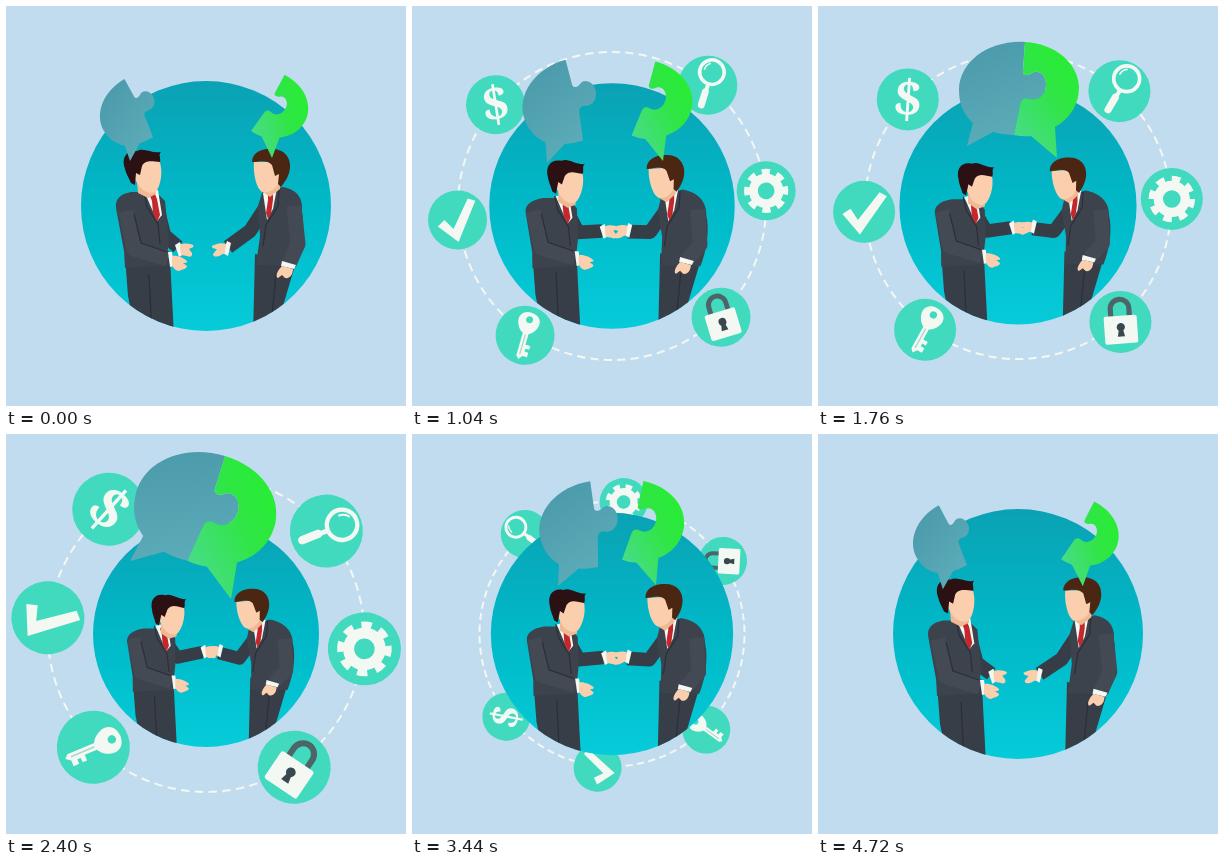
Animation, 400 px wide and 400 px high, one loop 4.8 s. Source, as an HTML page:

```html
<!DOCTYPE html>
<html lang="en">
<head>
<meta charset="utf-8">
<title>Handshake</title>
<style>
html, body { margin: 0; width: 100%; height: 100%; overflow: hidden; background: #c1dcee; }
svg { display: block; width: 100vw; height: 100vh; }
.suit { fill: #3d434d; }
.legs { fill: #383e48; }
.sleeve { fill: none; stroke: #434a54; stroke-width: 15; stroke-linejoin: round; }
.far { stroke: #373d47; stroke-width: 14; }
.skin { fill: #fbcfae; }
.white { fill: #f4f8f3; }
.tie { fill: #c4282d; }
.line { fill: none; stroke: #f4f8f3; }
.fold { fill: none; stroke: #2a2f39; stroke-width: 1.3; }
.badge { fill: #41dabf; }
.dark { fill: #39484f; }
</style>
</head>
<body>
<svg viewBox="0 0 400 400">
  <defs>
    <linearGradient id="sea" x2="0" y2="1">
      <stop stop-color="#0aa2b4"/><stop offset=".5" stop-color="#00b9c8"/><stop offset="1" stop-color="#06cbd9"/>
    </linearGradient>
    <linearGradient id="steel" x1=".2" x2=".5" y2="1">
      <stop stop-color="#4b9aab"/><stop offset="1" stop-color="#5dacb9"/>
    </linearGradient>
    <linearGradient id="lime" x1=".9" x2=".2" y2="1">
      <stop stop-color="#24f02c"/><stop offset=".45" stop-color="#30e546"/><stop offset="1" stop-color="#4adb8e"/>
    </linearGradient>
    <clipPath id="round"><circle cx="200" cy="200" r="125"/></clipPath>
  </defs>

  <circle id="ring" class="line" cx="200" cy="200" pathLength="936" stroke-width="2" stroke-dasharray="8 5"/>

  <g id="icons">
    <g><circle class="badge" r="30"/>
      <text class="white" transform="rotate(4)" y="17" text-anchor="middle" font-family="Noto Serif, serif" font-weight="800" font-size="50">$</text></g>
    <g><circle class="badge" r="30"/>
      <circle class="line" cx="7" cy="-12" r="12.5" fill="#63e2ca" stroke-width="3.6"/>
      <path class="line" d="M0 0L-3 5" stroke-width="4"/>
      <path class="line" d="M-4 6L-11 18" stroke-width="7" stroke-linecap="round"/>
      <path class="line" d="M0 -16Q3 -21 8 -21" stroke-width="1.6"/></g>
    <g><circle class="badge" r="30"/>
      <circle class="line" r="13" stroke-width="9"/>
      <circle class="line" r="19" stroke-width="7" pathLength="80" stroke-dasharray="5.4 4.6"/></g>
    <g><circle class="badge" r="30"/>
      <g transform="rotate(-4)">
        <path d="M-9 -5V-13A9 9 0 0 1 9 -13V-5" fill="none" stroke="#4e6469" stroke-width="5"/>
        <rect class="white" x="-16" y="-6" width="32" height="27" rx="2"/>
        <circle class="dark" cy="5" r="4"/><path class="dark" d="M-1.5 5H1.5L3.5 14H-3.5Z"/>
      </g></g>
    <g><circle class="badge" r="30"/>
      <g transform="rotate(29)">
        <path class="white" fill-rule="evenodd" d="M0 -24C9 -24 13 -17 10 -10C8 -5 5 -3 3 -2V9H8V13H4V16H8V21H3L0 25L-3 22V-2C-5 -3 -8 -5 -10 -10C-13 -17 -9 -24 0 -24ZM0 -20A3.5 3.5 0 0 0 0 -13A3.5 3.5 0 0 0 0 -20Z"/>
        <path d="M0 -1V20" stroke="#a9d8ce" stroke-width="1.3"/>
      </g></g>
    <g><circle class="badge" r="30"/>
      <path class="white" d="M-21 2L-13 -3L-6 8L15 -19L22 -15L-4 22Z"/></g>
  </g>

  <g id="scene">
    <circle cx="200" cy="200" r="125" fill="url(#sea)"/>
    <g clip-path="url(#round)">
      <path class="legs" d="M119 250L164 252L168 330H130L122 290Z"/>
      <path class="fold" d="M143 268L146 330"/>
      <path id="armL" class="sleeve far"/>
      <g id="handL">
        <path class="white" d="M-11 -5L-6 -8L-2 4L-7 7Z"/>
        <path class="skin" d="M-6 -5C-1 -8 5 -6 7 -5C9 -3 5 -2 3 -1L6 3C7 6 4 8 1 6L-5 5Z"/>
      </g>
      <path id="torsoL" class="suit"/>
      <g id="shirtL">
        <path class="white" d="M139 187L152 184L156 209L151 215Z"/>
        <path class="tie" d="M144 190L149 188L151 193L154 209L151 216L147 207L146 195Z"/>
        <path class="fold" d="M138 187L141 201L152 218L154 238"/>
      </g>
      <path class="sleeve" d="M120 205L128 243L162 253"/>
      <path class="fold" d="M128 208L135 237L161 246"/>
      <path class="white" d="M162 246L166 246L168 260L164 261Z"/>
      <path class="skin" d="M166 250C171 249 178 252 181 255C182 257 178 257 177 257L181 260C181 263 177 263 173 265C169 265 167 261 166 259Z"/>
      <g id="headL">
        <path fill="#efb994" d="M131 176L149 178L150 188L142 192L132 187Z"/>
        <path class="skin" d="M130 157L152 152C157 160 156 176 151 184C147 189 139 187 134 181L128 172Z"/>
        <path fill="#2b1014" d="M119 163C115 152 120 144 131 145C138 141 146 148 155 146C152 149 155 151 154 156C147 156 140 153 136 160L134 169L130 167L129 179L125 177C123 172 120 168 119 163Z"/>
      </g>

      <path class="legs" d="M249 248L290 256L277 300L266 330H247Z"/>
      <path class="fold" d="M270 268L264 330"/>
      <path id="armR" class="sleeve far"/>
      <g id="handR">
        <path class="white" d="M12 -7L8 -9L4 3L9 6Z"/>
        <path class="skin" d="M7 -6C2 -8 -4 -6 -7 -4C-8 -2 -4 -1 -2 -1L-6 4C-6 7 -3 7 0 6L6 3Z"/>
      </g>
      <path id="torsoR" class="suit"/>
      <g id="shirtR">
        <path class="white" d="M257 187L271 182L267 203L261 214Z"/>
        <path class="tie" d="M262 188L267 186L267 194L265 208L262 213L260 207L262 194Z"/>
        <path class="fold" d="M273 183L272 200L260 219L257 240"/>
      </g>
      <path id="nearR" class="sleeve"/>
      <g id="palmR">
        <path class="white" d="M276 255L290 259L288 263L275 260Z"/>
        <path class="skin" d="M276 260L287 263C287 268 284 273 279 272L276 269L272 272C269 271 271 265 276 260Z"/>
      </g>
      <g id="headR">
        <path fill="#efb994" d="M258 177L274 172L274 183L264 191L258 187Z"/>
        <path class="skin" d="M248 156L274 156L275 172C272 182 263 188 256 186C250 182 247 167 248 156Z"/>
        <path fill="#4b2613" d="M246 156C246 147 256 142 266 143C278 143 285 151 284 162C283 171 278 177 275 181L272 178L273 168L269 170L266 159C261 153 253 156 246 156Z"/>
      </g>
    </g>
  </g>

  <path id="bubbleL" fill="url(#steel)" d="M207 36L205 64C204 70 210 70 214 67C221 63 229 70 228 80C227 90 219 95 212 93C206 91 203 93 202 99L196 129Q185 129 175 126L149 140L155 117C144 107 141 96 141 83C142 56 170 34 207 36Z"/>
  <path id="bubbleR" fill="url(#lime)" d="M207 36L205 64C204 70 210 70 214 67C221 63 229 70 228 80C227 90 219 95 212 93C206 91 203 93 202 99L196 129Q205 131 213 130L239 152L237 121C253 112 261 98 261 81C260 57 238 38 207 36Z"/>
</svg>

<script>
const LOOP = 4800, STEP = 80;
const $ = id => document.getElementById(id);
const lerp = (a, b, w) => a + (b - a) * w;

// Rows are [key, ...values]; returns the values at x.
function track(rows, x) {
  let i = 1;
  while (i < rows.length - 1 && rows[i][0] < x) i++;
  const a = rows[i - 1], b = rows[i];
  const w = (x - a[0]) / (b[0] - a[0]);
  return a.slice(1).map((v, n) => lerp(v, b[n + 1], w));
}

// Blends two path strings of the same structure.
function morph(a, b, w) {
  const to = b.match(/-?[\d.]+/g);
  let i = 0;
  return a.replace(/-?[\d.]+/g, v => lerp(+v, +to[i++], w).toFixed(2));
}

// time, ring radius, orbit angle, icon tilt, icon radius
const orbit = [
  [0, 92, -235, -238, 18], [440, 119, -128, -131, 21.5], [560, 126, -98, -103, 23],
  [880, 147, -32, -44, 27.5], [1040, 154, 0, -13, 29.5], [1120, 156, 7, 10, 33],
  [1200, 157.5, 11, 35, 36], [1500, 154, 6, 12, 33], [1760, 153, 3, 0, 31],
  [1840, 153, 3, 0, 31], [2240, 155, 7, 16, 33.5], [2400, 158, 11, 38, 36.5],
  [2480, 157, 8, 30, 34], [2800, 152, -11, 0, 28.5], [3440, 132.5, -79, -83, 24],
  [3920, 119, -128, -131, 21.5], [4800, 92, -235, -238, 18]
];
const angles = [221.3, 308.2, 354, 45.3, 124.1, 175.2];

// progress, tail tip x, tail tip y, scale, angle
const leftBubble = [
  [0, 124, 155, .69, -33], [.433, 135, 157, .88, -19], [.567, 146, 152, .92, -12],
  [.733, 149, 140, 1, 0], [.833, 142, 141, 1.035, 1.4], [.933, 131, 134, 1.13, 8], [1, 124, 127, 1.19, 13]
];
const rightBubble = [
  [0, 266, 152, .7, 24], [.433, 251, 155, .83, 11], [.567, 244, 151, .87, 8.5],
  [.733, 239, 152, 1, 0], [.833, 234.8, 155.7, 1.035, 1.4], [.933, 230, 162, 1.13, 8], [1, 225, 165, 1.19, 13]
];
const lean = [[0, 0], [.2, .32], [.433, .74], [.733, .86], [1, 1]];

const shapes = {
  torsoL: ['M125 186C114 188 109 193 110 202L118 245L119 262L160 259L163 235L159 195L150 186Z',
           'M131 194C118 196 111 202 113 210L119 248L119 264L163 262L166 235L166 205L156 194Z'],
  torsoR: ['M256 187L277 181C293 184 297 194 296 206C299 222 296 245 290 260L250 259L254 230L252 200Z',
           'M248 192L270 184C288 187 296 198 296 210C300 226 296 248 290 262L250 261L250 232L245 206Z'],
  armL: ['M151 200L158 229L172 241', 'M157 210L168 226L196 220'],
  armR: ['M259 202L244 225L222 241', 'M252 207L237 227L214 221'],
  nearR: ['M288 200L292 238L283 258', 'M287 205L289 240L274 254']
};

const set = (id, value) => $(id).setAttribute('transform', value);
const shift = (id, x, y) => set(id, `translate(${x} ${y})`);

function poseBubble(id, rows, p, tip) {
  const [x, y, s, a] = track(rows, p);
  set(id, `translate(${x} ${y}) rotate(${a}) scale(${s}) translate(${-tip[0]} ${-tip[1]})`);
}

function draw(t) {
  const p = 1 - Math.abs(1 - t / 2400);
  const [w] = track(lean, p);
  const k = 1 - .096 * p * p;
  set('scene', `translate(200 200) scale(${k}) translate(-200 -200)`);

  for (const id in shapes) $(id).setAttribute('d', morph(...shapes[id], w));
  shift('handL', lerp(180, 205, w), lerp(244, 220, w));
  shift('handR', lerp(213, 207, w), lerp(244, 220, w));
  shift('palmR', -9 * w, -4 * w);
  shift('shirtL', 5 * w, 4 * w);
  shift('shirtR', -5 * w, 2 * w);
  set('headL', `translate(${18 * w} ${13 * w}) rotate(${8 * w} 140 185)`);
  set('headR', `translate(${-12 * w} ${7 * w}) rotate(${-5 * w} 264 185)`);

  poseBubble('bubbleL', leftBubble, p, [149, 140]);
  poseBubble('bubbleR', rightBubble, p, [239, 152]);

  const [r, turn, tilt, size] = track(orbit, t);
  $('ring').setAttribute('r', r);
  set('ring', `rotate(${turn} 200 200)`);
  [...$('icons').children].forEach((icon, i) => {
    const a = (angles[i] + turn) * Math.PI / 180;
    const x = 200 + (r + 1) * Math.cos(a), y = 201 + (r + 1) * Math.sin(a);
    icon.setAttribute('transform', `translate(${x} ${y}) rotate(${tilt}) scale(${size / 30})`);
  });
}

function tick() {
  draw(Math.floor(performance.now() % LOOP / STEP) * STEP);
  requestAnimationFrame(tick);
}
tick();
</script>
</body>
</html>
```
